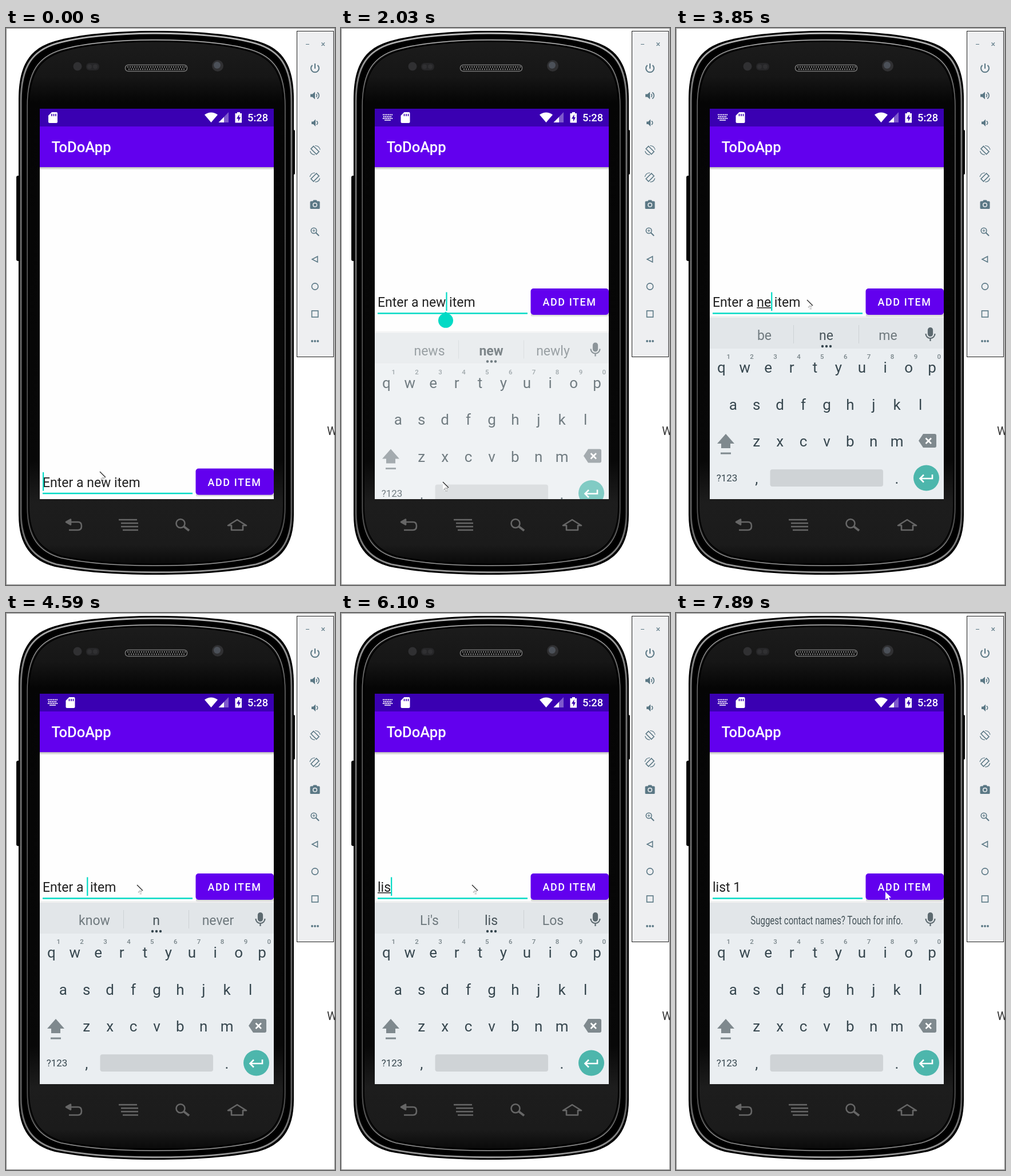
Write an HTML page that moves like this. It is 575 by 973 pixels and loops after 8 s.

```html
<!DOCTYPE html>
<html lang="en">
<head>
<meta charset="utf-8">
<title>To-do list on a phone</title>
<style>
html, body { margin: 0; width: 100%; height: 100%; overflow: hidden; background: #fff; }
svg { display: block; width: 575px; height: 973px; font-family: Roboto, sans-serif; }
text { white-space: pre; }
.mid { text-anchor: middle; }
.line { fill: none; stroke: #5b7885; stroke-width: 1.6; }
.solid { fill: #5b7885; }
.nav { fill: none; stroke: #666; stroke-width: 2.6; stroke-linejoin: round; }
</style>
</head>
<body>
<svg viewBox="0 0 575 973">
<defs>
  <path id="body" d="M22 125C22 60 45 35 85 23C130 10 200 5 262.5 5C325 5 395 10 440 23C480 35 503 60 503 125V850C503 905 480 930 440 941C390 951 330 955 262.5 955C195 955 135 951 85 941C45 930 22 905 22 850Z"/>
  <linearGradient id="rim" x2="0" y2="1">
    <stop offset="0" stop-color="#bbb"/><stop offset=".1" stop-color="#777"/>
    <stop offset=".9" stop-color="#5a5a5a"/><stop offset="1" stop-color="#999"/>
  </linearGradient>
  <linearGradient id="face" x2="0" y2="1">
    <stop offset="0" stop-color="#1c1c1c"/><stop offset=".07" stop-color="#161616"/>
    <stop offset=".12" stop-color="#050505"/><stop offset=".8" stop-color="#080808"/>
    <stop offset=".88" stop-color="#1d1d1d"/><stop offset=".96" stop-color="#1b1b1b"/>
    <stop offset="1" stop-color="#080808"/>
  </linearGradient>
  <linearGradient id="shade" x2="0" y2="1">
    <stop offset="0" stop-color="#000" stop-opacity=".28"/><stop offset="1" stop-color="#000" stop-opacity="0"/>
  </linearGradient>
  <clipPath id="screen"><path d="M59 141H468V823H59Z"/></clipPath>
</defs>

<path d="M.5 973V.5H575M574.5 0V973M0 972.5H575" fill="none" stroke="#858585"/>
<text x="561" y="711" font-size="20" fill="#333">W</text>

<!-- handset -->
<rect x="18" y="258" width="8" height="149" rx="3" fill="#0a0a0a"/>
<rect x="499" y="178" width="6" height="78" rx="2" fill="#0a0a0a"/>
<use href="#body"/>
<g fill="none" stroke="url(#rim)">
  <use href="#body" transform="translate(262.5 480) scale(.983 .991) translate(-262.5 -480)" stroke-width="3"/>
  <use href="#body" transform="translate(262.5 480) scale(.937 .967) translate(-262.5 -480)" fill="url(#face)" stroke-width="1.5"/>
</g>
<use href="#body" transform="translate(262.5 480) scale(.925 .961) translate(-262.5 -480)" fill="none" stroke="#000" stroke-width="2"/>
<g fill="#303032">
  <circle cx="125" cy="67" r="7.5"/><rect x="140" y="61" width="23" height="13" rx="6" fill="#262628"/>
  <circle cx="146" cy="67.5" r="4"/><circle cx="156" cy="67.5" r="4"/>
  <circle cx="370" cy="66" r="10"/><circle cx="369" cy="65" r="6" fill="#4b5058"/>
</g>
<rect x="208.5" y="64.500" width="108" height="11" rx="5" fill="#111" stroke="#777" stroke-width="1.500"/>
<path d="M212 68H314M214 72H312" stroke="#777" stroke-width="2.5" stroke-dasharray="2 2"/>
<g class="nav">
  <path d="M112 863H126Q132 863 132 870T126 877H110"/><path d="M105 863L113 858.500V867.500Z" fill="#666"/>
  <path d="M197 859H229M201 865H231M201 871H231M204 877H231"/>
  <circle cx="305" cy="865.500" r="7.500"/><path d="M311 871L320 878" stroke-width="4"/>
  <path d="M388 869L404 859L420 869H414V877H394V869Z"/>
</g>

<!-- emulator toolbar -->
<rect x="508.500" y="5.500" width="64" height="569" fill="#eeeff1" stroke="#222"/>
<path d="M524 28.500H530M551.500 25.500L557 31M557 25.500L551.500 31" class="line" style="stroke-width:1.100"/>
<g class="line">
  <path d="M540 62V71M535.500 65A7 7 0 1 0 544.500 65" stroke-width="2"/>
  <path d="M544 112.500A6.500 6.500 0 0 1 544 123.500M542 115.500A3 3 0 0 1 542 120.500"/>
  <path d="M542.500 162.500A3.500 3.500 0 0 1 542.500 169"/>
  <g id="turn"><path d="M537.500 206.500L547 216L542.500 220.500L533 211Z"/><path d="M540 205.500Q547 205.500 549 212.500M540 221.500Q533 221.500 531.500 215" stroke-width="1.200"/></g>
  <use href="#turn" transform="translate(1080 47.500) scale(-1 1)"/>
  <circle cx="538" cy="354" r="4.800"/><path d="M541.500 357.500L547 363" stroke-width="2"/><path d="M535.500 354H540.500M538 351.500V356.500" stroke-width="1.100"/>
  <path d="M544.500 399V409L535 404Z"/>
  <circle cx="540" cy="451.500" r="5.600"/>
  <rect x="534.500" y="494" width="11" height="11"/>
</g>
<g class="solid">
  <path d="M532 115.500H535.500L540 111.500V124.500L535.500 120.500H532Z"/>
  <path d="M534 163.500H537L541 159.500V172L537 168H534Z"/>
  <path d="M533 302.500H536L537.500 300.500H542.500L544 302.500H547Q548.500 302.500 548.500 304V314.500Q548.500 316 547 316H533Q531.500 316 531.500 314.500V304Q531.500 302.500 533 302.500Z"/>
  <circle cx="540" cy="309" r="3.300" fill="#5b7885" stroke="#eeeff1" stroke-width="1.500"/>
  <circle cx="535" cy="547" r="1.900"/><circle cx="540" cy="547" r="1.900"/><circle cx="545" cy="547" r="1.900"/>
</g>

<!-- display -->
<g clip-path="url(#screen)">
  <path d="M59 141H468V823H59Z" fill="#fefefe"/>
  <rect x="59" y="243" width="409" height="5" fill="url(#shade)"/>
  <path d="M59 172H468V243H59Z" fill="#6200ee"/>
  <path d="M59 141H468V172H59Z" fill="#3a00b2"/>
  <text x="79.500" y="217" font-size="25.600" font-weight="500" fill="#fff">ToDoApp</text>
  <g fill="#fff">
    <g id="kbIcon">
      <path d="M73 151.500H90M74 155H89M73 158H90" stroke="#fff" stroke-width="1.800" stroke-dasharray="2 1"/>
      <path d="M76 161H87" stroke="#fff" stroke-width="1.500"/>
    </g>
    <g id="card">
      <path d="M80 147H88Q90 147 90 149V164Q90 166 88 166H76Q74 166 74 164V153Z"/>
      <path d="M80 150V154M83.500 150V154M87 150V154" stroke="#3a00b2" stroke-width="1.600"/>
    </g>
    <path d="M358.500 165L347 151.500Q358.500 143.500 370 151.500Z"/>
    <path d="M389 147V165H371.500Z" opacity=".35"/><path d="M381 155.500V165H371.500Z"/>
    <path d="M404 147H409V149H412V165.500H400.500V149H404Z"/>
    <path d="M407.500 151L403 158.500H406V163.500L410 156H407.500Z" fill="#3a00b2"/>
    <text x="422" y="163" font-size="18.300" font-weight="500">5:28</text>
  </g>

  <!-- entry row -->
  <g id="row">
    <rect x="332" y="499" width="136" height="6" rx="3" fill="url(#shade)"/>
    <rect x="331.500" y="455" width="136.500" height="46" rx="5" fill="#6200ee"/>
    <text x="352.500" y="485" font-size="17.900" font-weight="500" letter-spacing="1.600" fill="#fff">ADD ITEM</text>
    <text id="entry" x="64" y="487" font-size="23" fill="#212121"></text>
    <path d="M64 498.500H326" stroke="#03dac5" stroke-width="2.500"/>
    <rect id="under" y="488" height="1.500" fill="#212121"/>
    <rect id="caret" y="461.500" width="2.200" height="32.500" fill="#03dac5"/>
  </g>

  <!-- keyboard -->
  <g id="board">
    <rect x="59" y="503" width="409" height="4" fill="#000" opacity=".05"/>
    <path d="M59 506H468V560H59Z" fill="#e2e6e9"/>
    <path d="M59 560H468V850H59Z" fill="#eaeef1"/>
    <g id="bar" class="mid" font-size="23" fill="#6f797e">
      <path d="M205.500 519V551M319.500 519V551" stroke="#cdd2d5"/>
      <text x="154.500" y="545"></text><text x="262.500" y="545" fill="#48545a"></text><text x="370.500" y="545"></text>
      <g id="dots" fill="#37474f"><circle cx="256" cy="556" r="2.200"/><circle cx="263" cy="556" r="2.200"/><circle cx="270" cy="556" r="2.200"/></g>
    </g>
    <text id="tip" class="mid" transform="translate(263.500 544) scale(.75 1)" font-size="20.100" fill="#455359">Suggest contact names? Touch for info.</text>
    <g fill="none" stroke="#5d6a70" stroke-width="2.200">
      <rect x="441" y="524" width="7" height="14" rx="3.500" fill="#5d6a70"/>
      <path d="M436.500 534A8 8 0 0 0 452.500 534M444.500 542V547"/>
    </g>
    <g id="keys" class="mid" font-size="26" fill="#37474f"></g>
    <g fill="#7f898e">
      <path d="M87 709L102 726H95V734H79V726H72ZM78 741.500H96V744.500H78Z"/>
      <path d="M432 709H452Q455 709 455 712V730Q455 733 452 733H432L424 721Z"/>
    </g>
    <path d="M436.500 716.500L446 726M446 716.500L436.500 726" stroke="#fff" stroke-width="2.600"/>
    <rect x="164.500" y="771" width="197.500" height="30" rx="4" fill="#cfd3d6"/>
    <circle cx="437.500" cy="786" r="22.500" fill="#4db6ac"/>
    <path d="M448 780V787H427M433 780.500L426.500 787L433 793.500" fill="none" stroke="#fff" stroke-width="2.600"/>
  </g>
  <path id="handle" d="M183 495.500L192.500 502A13 13 0 1 1 173.500 502Z" fill="#03dac5"/>
</g>

<g id="mouse">
  <path d="M0 0L10 10H6L8 15L5.500 16L3.500 11L0 13.500Z" fill="#fff"/>
  <path id="edge" d="M0 0L10 10" stroke="#222" stroke-width="1.200"/>
  <path id="specks" d="M8 10.500H3M2 12.500H8M5 15.500H8" stroke="#333" stroke-dasharray="1 1.300"/>
</g>
</svg>

<script>
const $ = id => document.getElementById(id);
const put = (el, attrs) => { for (const k in attrs) el.setAttribute(k, attrs[k]); };
const show = (id, on) => { $(id).style.display = on ? '' : 'none'; };
const pen = document.createElement('canvas').getContext('2d');
pen.font = '23px Roboto, sans-serif';
const width = s => pen.measureText(s).width;

// key caps
const PITCH = 40.9;
const cap = (s, x, y, extra = '') => `<text x="${x}" y="${y}" ${extra}>${s}</text>`;
let caps = '';
['qwertyuiop', 'asdfghjkl', 'zxcvbnm'].forEach((keys, r) => [...keys].forEach((c, i) => {
  caps += cap(c, 59 + PITCH * (i + [.5, 1, 2][r]), 602 + 64.7 * r);
  if (!r) caps += cap((i + 1) % 10, 91.7 + PITCH * i, 578, 'font-size="11.5" font-weight="500" fill="#788489"');
}));
caps += cap('?123', 89, 792, 'font-size="17"') + cap(',', 140.8, 796) + cap('.', 386, 796);
$('keys').innerHTML = caps;

// pre/post: text around the caret; mark: underlined letters before it
const steps = [
  [0, { pre: '', post: 'Enter a new item', mark: 0, caret: 1, open: 0, drop: 0, fade: 1, handle: 0,
        words: ['news', 'new', 'newly'], bold: 1, dots: 1, tip: 0, mouse: [164, 775], edge: 1 }],
  [400, { caret: 0 }],
  [930, { caret: 1, mouse: [165, 778] }],
  [1080, { mouse: [168, 784] }],
  [1360, { caret: 0, mouse: [174, 790] }],
  [1480, { mouse: [178, 793] }],
  [1880, { caret: 1, open: 1, pre: 'Enter a new', post: ' item', handle: 1, drop: 60, fade: .25 }],
  [2030, { drop: 26.5, fade: .7 }],
  [2180, { drop: 0, fade: 1 }],
  [2610, { pre: 'Enter a ne', handle: 0 }],
  [2740, { mark: 2 }],
  [2880, { words: ['be', 'ne', 'me'], bold: 0 }],
  [3190, { caret: 0, mouse: [181, 760] }],
  [3320, { mouse: [192, 640] }],
  [3450, { mouse: [208, 500] }],
  [3580, { mouse: [220, 419] }],
  [3700, { caret: 1, mouse: [226, 450] }],
  [3850, { mouse: [229, 475] }],
  [4160, { pre: 'Enter a n', mark: 1 }],
  [4290, { words: ['know', 'n', 'never'] }],
  [4590, { pre: 'Enter a ', mark: 0 }],
  [4740, { words: ['little', 'new', 'good'] }],
  [5170, { pre: 'Enter a  ite', post: '', mark: 3, words: ['ITE', 'ite', "it's"] }],
  [5290, { pre: 'Enter a', mark: 0 }],
  [5410, { pre: 'En' }],
  [5560, { pre: '' }],
  [5680, { words: ['', '', ''], dots: 0 }],
  [5800, { pre: 'l', mark: 1 }],
  [5950, { pre: 'li', mark: 2, words: ['Li', 'li', 'lo'], dots: 1 }],
  [6100, { pre: 'lis', mark: 3, words: ["Li's", 'lis', 'Los'] }],
  [6220, { pre: 'list', mark: 4 }],
  [6370, { words: ['lost', 'list', 'lists'] }],
  [6770, { pre: 'list ', mark: 0 }],
  [6920, { pre: 'list 1' }],
  [7070, { tip: 1 }],
  [7630, { caret: 0, mouse: [262, 478] }],
  [7760, { mouse: [328, 483] }],
  [7890, { mouse: [366, 487], edge: 0 }]
];

function draw(t) {
  const s = Object.assign({}, ...steps.filter(k => k[0] <= t).map(k => k[1]));
  const end = 64 + width(s.pre);
  const start = 64 + width(s.pre.slice(0, s.pre.length - s.mark));
  $('entry').textContent = s.pre + s.post;
  put($('under'), { x: start, width: end - start });
  put($('caret'), { x: end });
  put($('row'), { transform: `translate(0 ${s.open ? 0 : 314.5})` });
  put($('card'), { transform: `translate(${s.open ? 30.5 : 0} 0)` });
  put($('board'), { transform: `translate(0 ${s.drop})`, opacity: s.fade });
  put($('mouse'), { transform: `translate(${s.mouse})` });
  show('board', s.open);
  show('kbIcon', s.open);
  show('caret', s.caret);
  show('handle', s.handle);
  show('bar', !s.tip);
  show('tip', s.tip);
  show('dots', s.dots);
  show('edge', s.edge);
  show('specks', s.edge);
  $('bar').querySelectorAll('text').forEach((el, i) => {
    el.textContent = s.words[i];
    put(el, { 'font-weight': i === 1 && s.bold ? 700 : 400 });
  });
}

const began = performance.now();
function tick() {
  draw((performance.now() - began) % 8000);
  requestAnimationFrame(tick);
}
tick();
</script>
</body>
</html>
```
